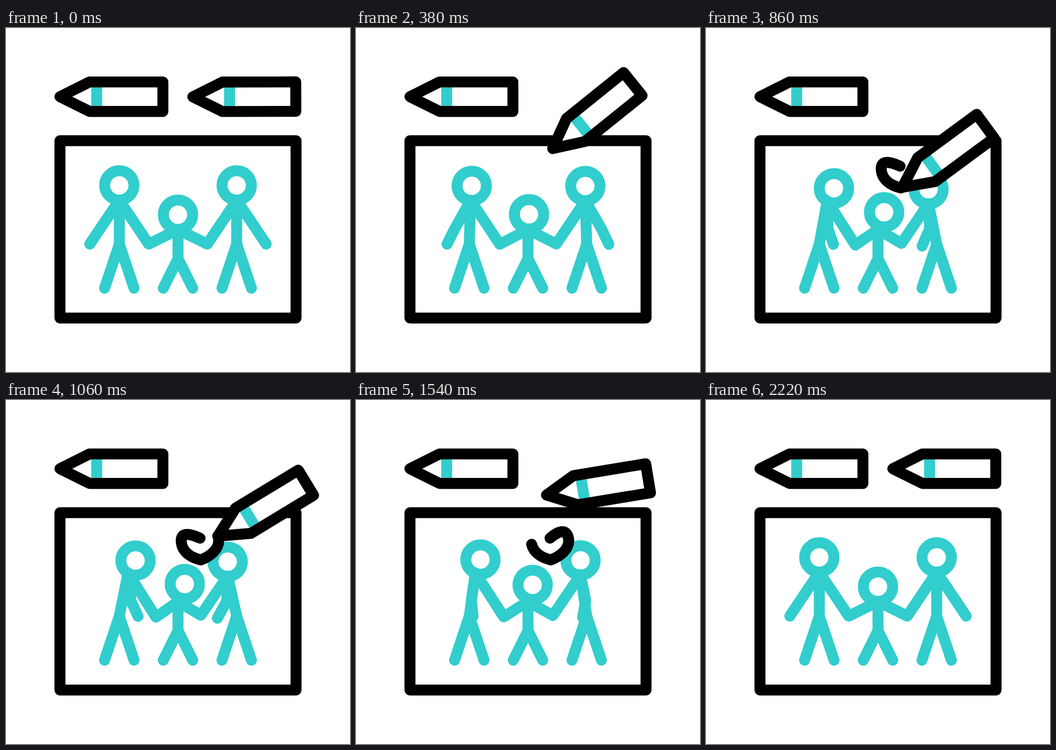
These frames come from a looping animation (640 by 640 pixels, 2400 ms). An HTML page:

```html
<!DOCTYPE html>
<html lang="en">
<head>
<meta charset="utf-8">
<title>Family drawing</title>
<style>
  html, body { margin: 0; width: 100%; height: 100%; overflow: hidden; background: #fff; }
  svg { display: block; width: 100vw; height: 100vh; }
  .line { fill: none; stroke: #000; stroke-width: 20.4; stroke-linecap: round; stroke-linejoin: round; }
  .teal { stroke: #32cdcd; }
  .solid { fill: #fff; }
</style>
</head>
<body>
<svg viewBox="0 0 640 640">
  <defs>
    <g id="pencil">
      <path class="solid" d="M0 0L55-27.4H191.5V27.4H55Z"/>
      <path class="line teal" style="stroke-linecap:butt" d="M68.3-22V22"/>
      <path class="line" d="M0 0L55-27.4H191.5V27.4H55Z"/>
    </g>
  </defs>
  <rect class="line" x="100.4" y="209.6" width="439.2" height="330"/>
  <path class="line teal" d="M183.4 484L210.8 402L238.2 484M292.6 484L320 429L347.4 484M401.8 484L429.2 402L456.6 484M320 375V429"/>
  <path id="limbs" class="line teal"/>
  <circle id="headL" class="line teal" r="27.3"/>
  <circle id="headC" class="line teal" r="27.3"/>
  <circle id="headR" class="line teal" r="27.3"/>
  <path id="heart" class="line" d="M361 257C352 253 343 250 337 250C329 250 326 255 326 261C326 282 344 293 362.5 297.5C380 291 395.7 278 395.7 262C395.7 252 391 245 384 245C376 245 368 251 361 257"/>
  <use href="#pencil" transform="translate(100.4 127.8)"/>
  <use id="mover" href="#pencil"/>
</svg>
<script>
const LOOP = 2400;
const DRAW = 510, LIFT = 1150;
const REST = { x: 347.6, y: 127.8 };
const $ = id => document.getElementById(id);
const heart = $('heart');
const len = heart.getTotalLength();
const touch = heart.getPointAtLength(0);

// [time, value] tables, straight between the steps
const TILT = [[0, 0], [DRAW, 52], [600, 47.3], [860, 36.4], [1070, 31], [LIFT, 24.8], [1280, 19.2], [1620, 6.4], [1770, 0]];
const INK = [[DRAW, 0], [600, .185], [860, .51], [1070, .81], [LIFT, 1]];
const ERASE = [[1380, 0], [2020, 1]];
const REACH = [[0, 0], [DRAW, 1], [LIFT, 1], [1280, .775], [1620, .26], [1770, 0]];

function at(table, t) {
  if (t <= table[0][0]) return table[0][1];
  for (let i = 1; i < table.length; i++) {
    const [t0, a] = table[i - 1], [t1, b] = table[i];
    if (t < t1) return a + (b - a) * (t - t0) / (t1 - t0);
  }
  return table[table.length - 1][1];
}

// cubic-bezier(x1, 0, x2, 1)
function ease(x, x1, x2) {
  let lo = 0, hi = 1, s = .5;
  for (let i = 0; i < 24; i++) {
    s = (lo + hi) / 2;
    const v = 3 * (1 - s) ** 2 * s * x1 + 3 * (1 - s) * s * s * x2 + s ** 3;
    if (v < x) lo = s; else hi = s;
  }
  return s * s * (3 - 2 * s);
}

function sway(t) {
  if (t < 1200) return ease(t / 1200, .6, .4);
  return t < 2220 ? 1 - ease((t - 1200) / 1020, .333, .5) : 0;
}

function drawFamily(p) {
  const pt = (x, y, dx, dy) => `${x + dx * p} ${y + dy * p}`;
  const head = (id, x, y, dx, dy) => {
    $(id).setAttribute('cx', x + dx * p);
    $(id).setAttribute('cy', y + dy * p);
  };
  const neckL = pt(210.8, 320.5, 16.5, 1.5), neckR = pt(429.2, 320.5, -17, 7);
  $('limbs').setAttribute('d',
    `M210.8 402L${neckL}L${pt(176, 372, 57, 1)}L${pt(156, 402, 91, .5)}` +
    `M429.2 402L${neckR}L${pt(464, 372, -54, 2)}L${pt(484, 402, -92, 4)}` +
    `M${neckL}L${pt(265.5, 402, 13.7, 2)}L320 375L${pt(374.5, 402, -12.3, -1.5)}L${neckR}`);
  head('headL', 210.8, 292.8, 30.6, 6);
  head('headC', 320, 347.3, 12.8, -5);
  head('headR', 429.2, 292.8, -17, 8.2);
}

function drawHeart(t) {
  const from = at(ERASE, t) * len, to = at(INK, t) * len;
  heart.style.display = to - from > .01 ? '' : 'none';
  heart.style.strokeDasharray = `${to - from} ${len * 2}`;
  heart.style.strokeDashoffset = -from;
}

function drawPencil(t) {
  let { x, y } = touch;
  if (t >= DRAW && t <= LIFT) {
    ({ x, y } = heart.getPointAtLength(at(INK, t) * len));
  } else {
    const r = at(REACH, t);
    const bow = (t < DRAW ? 59 : 20) * r * r * (1 - r);
    x = REST.x + (touch.x - REST.x) * r + bow;
    y = REST.y + (touch.y - REST.y) * r;
  }
  $('mover').setAttribute('transform', `translate(${x} ${y}) rotate(${-at(TILT, t)})`);
}

const start = performance.now();
function frame() {
  const t = (performance.now() - start) % LOOP;
  drawFamily(sway(t));
  drawHeart(t);
  drawPencil(t);
  requestAnimationFrame(frame);
}
frame();
</script>
</body>
</html>
```
